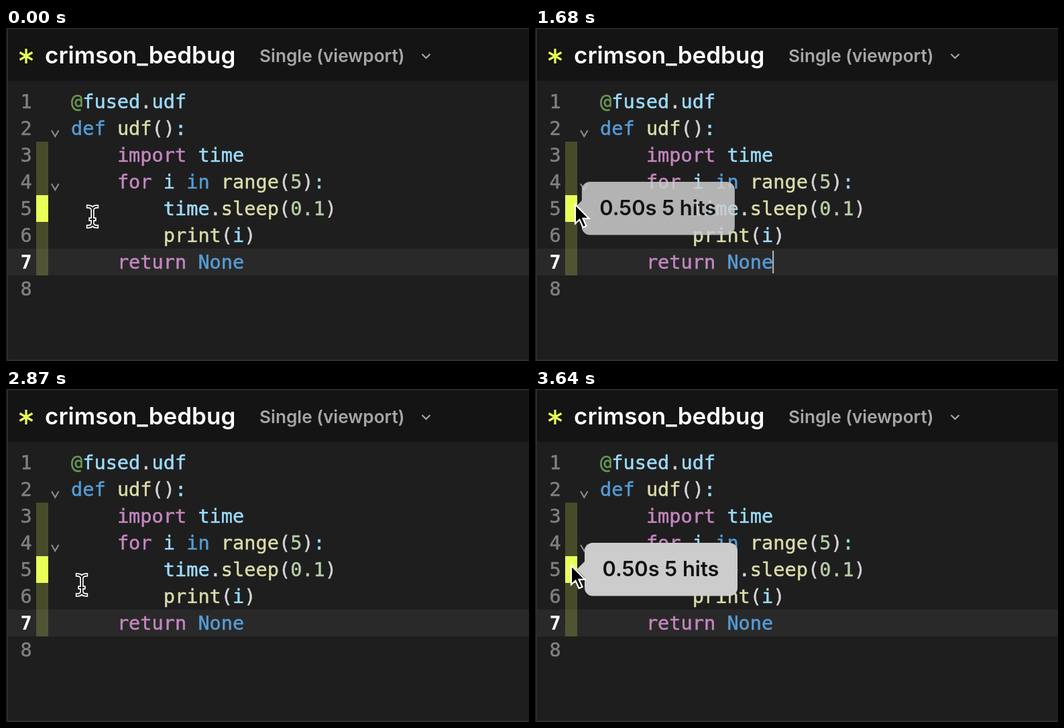
Write an HTML page that moves like this. It is 780 px wide and 498 px high and loops after 3920 ms.

```html
<!DOCTYPE html>
<html lang="en">
<head>
<meta charset="utf-8">
<title>Line profiler tooltip</title>
<style>
  html, body { margin: 0; width: 100%; height: 100%; overflow: hidden; background: #1e1e1e; }
  svg { display: block; width: 780px; height: 498px; }
  .ui { font-family: Inter, sans-serif; font-weight: 600; }
  .mono { font-family: "DejaVu Sans Mono", monospace; font-size: 28.6px; white-space: pre; }
  .mono text, .mono tspan { fill: currentColor; stroke: currentColor; stroke-width: .5; }
  .num { color: #808080; text-anchor: middle; }
  .num.on { color: #fff; font-weight: bold; }
  .num, .num.on { stroke-width: 0; }
  .at { color: #6a9955; }
  .var { color: #9cdcfe; }
  .key { color: #569cd6; }
  .fn { color: #dcdcaa; }
  .ctl { color: #c586c0; }
  .lit { color: #b5cea8; }
  .pun { color: #d4d4d4; }
  .line { fill: none; stroke-width: 2.2; }
</style>
</head>
<body>
<svg viewBox="0 0 780 498">
  <defs>
    <path id="stem" d="M-6.5 -15Q0 -15 0 -9.5Q0 -15 6.5 -15M0 -10V10M-6.5 15Q0 15 0 9.5Q0 15 6.5 15M-3 4H3"/>
  </defs>
  <rect width="780" height="498" fill="#1e1e1e"/>
  <rect width="780" height="79" fill="#141414"/>
  <rect width="780" height="1.5" fill="#303030"/>
  <rect width="2" height="498" fill="#1a1a1a"/>
  <rect x="1.5" width="1.5" height="498" fill="#323232"/>
  <rect x="3" y="496" width="777" height="2" fill="#303030"/>
  <rect x="3" y="330" width="777" height="40" fill="#292929"/>

  <path d="M30 31V53M20.5 36.5L39.5 47.5M39.5 36.5L20.5 47.5" stroke="#e8ff59" stroke-width="3.2"/>
  <text class="ui" x="58" y="53" font-size="35" fill="#fff">crimson_bedbug</text>
  <text class="ui" x="378" y="51" font-size="26.2" fill="#a6a6a6">Single (viewport)</text>
  <path class="line" d="M620.5 39l6 6 6-6" stroke="#a6a6a6"/>

  <g fill="#e8ff59">
    <rect x="45" y="170" width="18" height="200" opacity=".2"/>
    <rect x="45" y="250" width="18" height="40"/>
  </g>
  <path class="line" d="M68 153l5.3 9 5.3-9M68 233l5.3 9 5.3-9" stroke="#8a8a8a"/>
  <g id="code" class="mono"></g>
  <rect id="caret" x="354" y="333" width="2.2" height="34" fill="#aeafad"/>

  <g id="tip">
    <path d="M62 270L75 257V283Z" fill="#ccc"/>
    <rect x="74" y="230" width="228" height="79.5" rx="12" fill="#ccc"/>
    <text class="ui" x="100.5" y="280" font-size="30.8" fill="#111">0.50s 5 hits</text>
  </g>

  <g id="arrow">
    <path d="M0 0V28.5L6.5 22.5L11.5 34L16.5 32L11.5 20.8H20.5Z" fill="#000" stroke="#fff" stroke-width="2.2"/>
  </g>
  <g id="beam" fill="none" stroke-linecap="square">
    <use href="#stem" stroke="#fff" stroke-width="5.4"/>
    <use href="#stem" stroke="#111" stroke-width="2"/>
  </g>
</svg>
<script>
const LOOP = 3920, STEP = 70;
const LEFT = 97, CHAR = 17.22, ROW = 40, BASE = 120;
const $ = id => document.getElementById(id);

// Each line: indent, then "class:text" tokens.
const lines = [
  [0, "at:@", "var:fused", "pun:.", "var:udf"],
  [0, "key:def ", "fn:udf", "pun:()", "var::"],
  [4, "ctl:import ", "var:time"],
  [4, "ctl:for ", "var:i ", "key:in ", "fn:range", "pun:(", "lit:5", "pun:)", "var::"],
  [8, "var:time", "pun:.", "fn:sleep", "pun:(", "lit:0.1", "pun:)"],
  [8, "fn:print", "pun:(", "var:i", "pun:)"],
  [4, "ctl:return ", "key:None"],
  [0]
];

function span(token) {
  const cut = token.indexOf(":");
  return `<tspan class="${token.slice(0, cut)}">${token.slice(cut + 1)}</tspan>`;
}

$("code").innerHTML = lines.map(([indent, ...tokens], i) => {
  const y = BASE + i * ROW;
  return `<text class="num${i === 6 ? " on" : ""}" x="30" y="${y}">${i + 1}</text>` +
    `<text x="${LEFT + indent * CHAR}" y="${y}">${tokens.map(span).join("")}</text>`;
}).join("");

// Pointer path: time, x, y
const path = [
  [0, 129, 282], [70, 124, 280], [210, 80, 267], [280, 64, 263], [350, 57, 261],
  [560, 52, 259.5], [1540, 52, 259.5], [1680, 60, 264], [1820, 92, 277],
  [1960, 111, 285], [2100, 113, 293], [2870, 113, 293], [3010, 101, 286],
  [3150, 72, 271], [3220, 62, 267], [3360, 54, 264], [LOOP, 54, 264]
];
const blinks = [[980, 1330], [1610, 2030], [2310, 2870], [3150, 3430]];

const ramp = (t, from, to) => Math.min(1, Math.max(0, (t - from) / (to - from)));

function pointer(t) {
  const i = path.findIndex(p => p[0] > t);
  const [t0, x0, y0] = path[i - 1], [t1, x1, y1] = path[i];
  const k = ramp(t, t0, t1);
  return [x0 + (x1 - x0) * k, y0 + (y1 - y0) * k];
}

function show(el, on) {
  el.style.visibility = on ? "visible" : "hidden";
}

function draw(now) {
  const t = Math.floor((now % LOOP) / STEP) * STEP;
  const [x, y] = pointer(t);
  const inText = x > 95;
  const place = `translate(${x} ${y})`;
  $("arrow").setAttribute("transform", place);
  $("beam").setAttribute("transform", place);
  show($("arrow"), !inText);
  show($("beam"), inText);

  const shown = ramp(t, 235, 445) - ramp(t, 1645, 1890) + ramp(t, 3385, 3595);
  $("tip").setAttribute("opacity", shown);
  $("tip").setAttribute("transform", `translate(${-29 * (1 - shown)} 0)`);
  show($("caret"), blinks.some(([on, off]) => t >= on && t < off));
}

const start = performance.now();
function tick() {
  draw(performance.now() - start);
  requestAnimationFrame(tick);
}
tick();
</script>
</body>
</html>
```
